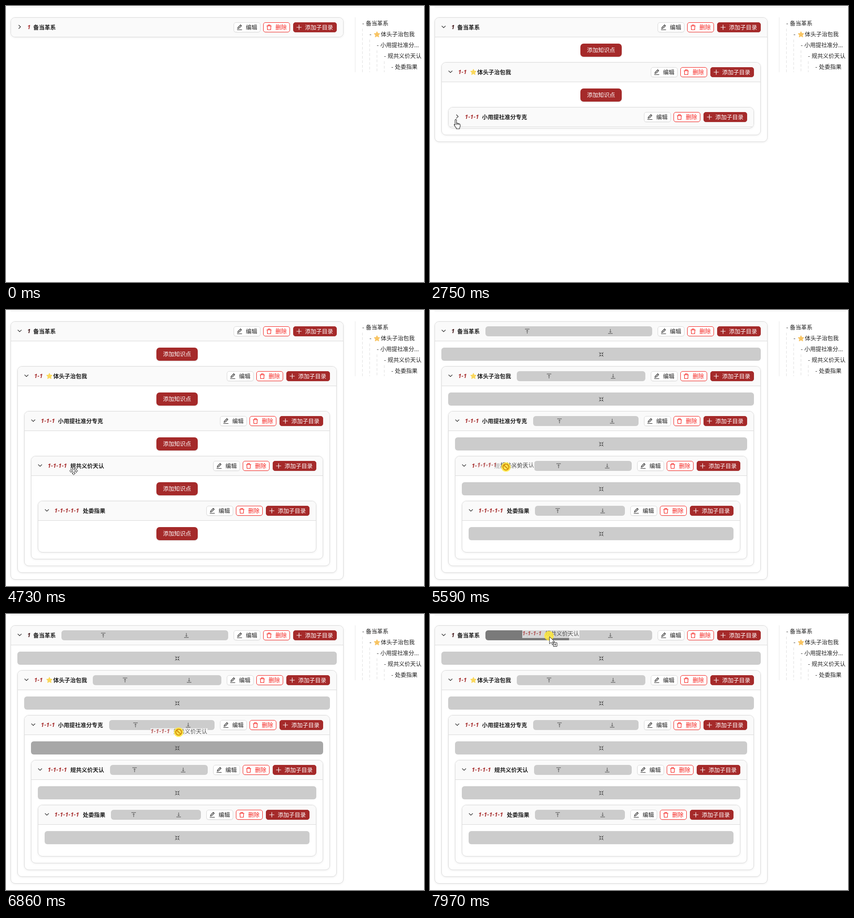
An HTML page that plays this animation: 920 px wide and 609 px high, repeating every 8000 ms.

```html
<!DOCTYPE html>
<html lang="zh-CN">
<head>
<meta charset="utf-8">
<style>
html, body { margin: 0; width: 100%; height: 100%; overflow: hidden; background: #fff; }
body { position: relative; color: #1f1f1f; font: 12.4px/24px "Noto Sans CJK SC", "Noto Sans CJK", "Noto Sans CJK JP", sans-serif; }
div, span, svg { position: absolute; box-sizing: border-box; white-space: nowrap; }
svg { overflow: visible; fill: none; }
.box { border: 1px solid #d9d9d9; border-radius: 10px; overflow: hidden; background: #fff; box-shadow: 0 1px 5px rgba(0,0,0,.07); }
.head { left: 0; right: 0; top: 0; height: 43px; line-height: 42px; background: #fafafa; border-bottom: 1px solid #d9d9d9; font-weight: 700; }
.body { left: 0; right: 0; top: 43px; bottom: 0; }
.num { color: #a52a2a; font: italic 700 12.5px/42px "Open Sans", "Noto Sans", sans-serif; letter-spacing: .45px; }
.btn { top: 10px; height: 22px; border: 1px solid #d9d9d9; border-radius: 5px; background: #fff; font-weight: 400; line-height: 20px; box-shadow: 0 1px 2px rgba(0,0,0,.05); }
.btn svg { left: 6px; top: 4px; }
.btn span { left: 26px; }
.del { color: #f5201c; border-color: #f5201c; }
.add, .point { color: #fff; background: #a52a2a; border-color: #a52a2a; }
.add span { left: 25px; }
.point { left: calc(50% - 45.5px); top: 14px; width: 91px; height: 29px; border-radius: 7px; line-height: 29px; text-align: center; box-shadow: 0 2px 2px rgba(0,0,0,.08); }
.zone { background: #ccc; color: #444; }
.zone svg { left: calc(50% - 6px); top: calc(50% - 6px); stroke-width: 1; }
.line { background: #ececec; }
#ghost { width: 126px; height: 17px; background: rgba(250,250,250,.72); }
#ghost span { line-height: 14px; opacity: .75; }
</style>
</head>
<body>
<script>
const LOOP = 8000, DRAG = 5450, STEP = 99;
const TITLES = ["备当革系", "体头子治包我", "小用提社准分专克", "规共义价天认", "处委指果"];
const TITLE_X = [60, 104, 114.5, 141.5, 169];
const ZONE_X = [122, 191, 227, 229, 231];
const OPEN_AT = [1270, 2090, 2710, 3250, 3970];
const PATH = [
  [280, 857, 592], [490, 449, 320], [700, 449, 320], [1120, 25, 42], [1480, 27, 44],
  [1770, 54, 134], [2050, 46, 138], [2330, 46, 138], [2680, 57, 250], [2970, 57, 250],
  [3230, 75, 342], [3480, 75, 342], [3750, 88, 433], [3960, 87, 441], [4450, 87, 441],
  [4590, 87, 395], [4730, 149, 355], [5090, 154, 349], [5450, 154, 349], [5740, 181, 344],
  [6100, 181, 344], [6480, 335, 360], [6640, 365, 315], [6700, 372, 288], [6800, 378, 275],
  [6860, 380, 261], [7130, 390, 200], [7270, 397, 150], [7400, 395, 95], [7500, 380, 78],
  [7690, 320, 62], [7760, 300, 53], [7970, 262, 48]
];
const ICON = {
  chevron: "M3.8 1.8 8 6 3.8 10.2",
  edit: "M2 8.8 2.6 6.3 8.3.7 10.3 2.7 4.6 8.3zM.5 11.5h11",
  trash: "M.5 3h11M3.8 3V.8h4.4V3M2 3l.5 8.5h7L10 3",
  plus: "M6 .5v11M.5 6h11",
  up: "M1 1.2h10M6 11V3.5M4 5.5 6 3.5 8 5.5",
  down: "M1 10.8h10M6 1v7.5M4 6.5 6 8.5 8 6.5",
  shrink: "M1 1l3.5 3.5M4.5 1.8v2.7H1.8M11 1 7.5 4.5M7.5 1.8v2.7h2.7M1 11l3.5-3.5M4.5 10.2V7.5H1.8M11 11 7.5 7.5M7.5 10.2V7.5h2.7"
};
const STAR = "M6.5.3 8.5 4.4 13 5 9.7 8.1 10.5 12.6 6.5 10.5 2.5 12.6 3.3 8.1 0 5 4.5 4.4z";

function el(parent, cls, style, html = "", tag = "div") {
  const e = document.createElement(tag);
  e.className = cls;
  e.style.cssText = style;
  e.innerHTML = html;
  parent.append(e);
  return e;
}
const text = (parent, cls, x, str) => el(parent, cls, `left:${x}px`, str, "span");
const icon = name => `<svg width="12" height="12" stroke="currentColor" stroke-width="1.2"><path d="${ICON[name]}"/></svg>`;
const star = (color, x, y) => `<svg width="13" height="13" style="left:${x}px;top:${y}px"><path d="${STAR}" fill="${color}" stroke="${color}" stroke-linejoin="round"/></svg>`;
const number = i => "1" + "-1".repeat(i);

// Page frame and outline on the right
el(document.body, "line", "left:10px;top:2px;width:906px;height:1px");
el(document.body, "line", "left:768px;top:25px;width:1px;height:121px;background:#e6e6e6");
TITLES.forEach((title, i) => {
  const x = 784 + 16 * i;
  const row = el(document.body, "", `left:${x}px;top:${26 + 24 * i}px;width:${916 - x}px;height:24px;overflow:hidden`);
  text(row, "", 0, "-");
  if (i == 1) row.innerHTML += star("#f8c462", 10, 6);
  text(row, "", i == 1 ? 25 : 8, i == 2 ? "小用提社准分..." : title);
  if (i < 4) el(document.body, "", `left:${x}px;top:${50 + 24 * i}px;width:1px;height:${96 - 24 * i}px;background:repeating-linear-gradient(#ddd 0 6px,transparent 6px 10px)`);
});

// Nested panels
const zones = [], points = [], drops = [];
function zone(parent, css, name, level, x0, x1, y, h) {
  const e = el(parent, "zone", css, icon(name));
  zones.push({ e, level, x0, x1, y0: y + STEP * level, y1: y + h + STEP * level });
  return e;
}
let parent = document.body;
const panels = TITLES.map((title, i) => {
  const left = 11 + 15 * i;
  const box = el(parent, "box", i ? "left:14px;right:14px;top:55px" : "left:10px;top:25px;width:733px");
  const head = el(box, "head", "");
  const chevron = el(head, "", "left:13px;top:14px;width:12px;height:12px;line-height:0", icon("chevron"));
  if (i == 1) head.insertAdjacentHTML("beforeend", star("#fad85c", 89 - left, 14));
  const num = text(head, "num", 47 + 14.9 * i - left, number(i));
  text(head, "", TITLE_X[i] - left, title);
  el(head, "btn", "right:182px;width:59px", icon("edit") + "<span>编辑</span>");
  el(head, "btn del", "right:117px;width:59px", icon("trash") + "<span>删除</span>");
  el(head, "btn add", "right:14px;width:96px", icon("plus") + "<span>添加子目录</span>");

  const x0 = ZONE_X[i], x1 = 489 - 15 * i, mid = (x0 + x1) / 2;
  const bar = el(head, "", `left:${x0 - left}px;top:10px;width:${x1 - x0}px;height:22px;border-radius:6px;overflow:hidden;line-height:0`);
  zone(bar, "left:0;width:50%;height:100%", "up", i, x0, mid, 36, 22);
  zone(bar, "left:50%;width:50%;height:100%", "down", i, mid, x1, 36, 22);

  const body = el(box, "body", "");
  points.push(el(body, "point", "", "添加知识点"));
  drops.push(bar, zone(body, "left:14px;right:14px;top:14px;height:29px;border-radius:6px;line-height:0", "shrink", i, 25 + 15 * i, 728 - 15 * i, 83, 29));
  parent = body;
  return { box, chevron, num, body };
});

// Dragged title and pointer
const ghost = el(document.body, "", "");
ghost.id = "ghost";
text(ghost, "num", 0, number(3));
text(ghost, "", 50.5, TITLES[3]);
const ARROW = '<path d="M0 0v16l3.8-3.5 2.5 5.3 2.4-1.1-2.4-5.2h5.2z" fill="#fff" stroke="#222"/>';
const pointer = el(document.body, "", "left:0;top:0", `<svg width="1" height="1">
<circle id="glow" r="10.5" fill="#ffe93b" opacity=".85"/>
<g id="arrow">${ARROW}</g>
<g id="hand" transform="translate(-5 -1)" stroke="#222" stroke-width="1.1"><path fill="#fff" d="M3.2 13V3a1.6 1.6 0 0 1 3.2 0v6.5q2-.8 2.6.8 2-.6 2.6.9 2.8-.6 2.8 2v3q0 2-1.4 4v1.8H6V20q-2-1.5-4.8-6.5-.3-2 2-.5z"/><path d="M6.4 9.5v4M9 10.3v3M11.6 11.2v2"/></g>
<path id="move" fill="#fff" stroke="#222" d="M0-9 3.5-5.5H1.5v4h4v-2L9 0 5.5 3.5v-2h-4v4h2L0 9l-3.5-3.5h2v-4h-4v2L-9 0l3.5-3.5v2h4v-4h-2z"/>
<g id="ban" stroke="#d48806" stroke-width="2"><circle r="6.5"/><path d="M-4.6-4.6 4.6 4.6"/></g>
<g id="copy" transform="translate(1 2)">${ARROW}<path d="M8.5 13.5h8v8h-8z" fill="#fff" stroke="#222"/><path d="M12.5 15.2v4.6M10.2 17.5h4.6" stroke="#222"/></g>
</svg>`);
const shapes = ["arrow", "hand", "move", "ban", "copy"].map(id => document.getElementById(id));
const glow = document.getElementById("glow");

const show = (e, on) => e.style.display = on ? "" : "none";
const ease = u => u <= 0 ? 0 : u >= 1 ? 1 : u < .5 ? 4 * u ** 3 : 1 - 4 * (1 - u) ** 3;

function pos(t) {
  const n = PATH.findIndex(k => k[0] > t);
  if (n < 0) return PATH[PATH.length - 1].slice(1);
  if (!n) return PATH[0].slice(1);
  const [t0, x0, y0] = PATH[n - 1], [t1, x1, y1] = PATH[n], u = (t - t0) / (t1 - t0);
  return [x0 + (x1 - x0) * u, y0 + (y1 - y0) * u];
}
const place = (e, x, y) => e.style.transform = `translate(${x}px,${y}px)`;
const inside = (z, [x, y]) => z.level < 3 && x >= z.x0 && x < z.x1 && y >= z.y0 && y < z.y1;

function cursor(t, [x, y], dragging) {
  if (dragging) return zones.some(z => inside(z, [x, y])) ? "copy" : "ban";
  const level = Math.floor((y - 25) / STEP);
  const opened = OPEN_AT.filter(s => t > s).length;
  if (x > 743 || level < 0 || level > opened || (y - 25) % STEP > 44) return "arrow";
  return x < 60 + 15 * level ? "hand" : "move";
}

function draw(t) {
  let inner = 0;
  for (let i = 4; i >= 0; i--) {
    const p = ease((t - OPEN_AT[i]) / 220), { box, chevron, num, body } = panels[i];
    inner = 44 + p * (i == 4 ? 70 : 70 + inner);
    box.style.height = inner + "px";
    body.style.opacity = p;
    chevron.style.transform = `rotate(${90 * p}deg)`;
    if (!i) num.style.color = p ? "#3f1214" : "";
  }

  const dragging = t >= DRAG, at = pos(t);
  points.forEach(e => show(e, !dragging));
  drops.forEach(e => show(e, dragging));
  // A drop zone darkens by the share of the last 200 ms spent over it
  const trail = Array.from({ length: 20 }, (_, k) => pos(t - 10 * k));
  for (const z of zones) {
    const share = dragging ? trail.filter(p => inside(z, p)).length / trail.length : 0;
    const c = Math.round(204 - 82 * share);
    z.e.style.background = `rgb(${c},${c},${c})`;
  }

  const kind = cursor(t, at, dragging);
  shapes.forEach(e => show(e, e.id == kind));
  show(glow, dragging);
  show(pointer, t >= 280);
  show(ghost, dragging);
  place(pointer, ...at);
  // The dragged title trails the pointer slightly
  const [gx, gy] = pos(t - 15);
  place(ghost, Math.round(gx - 62), Math.round(gy - 12));
}

function tick() {
  draw(performance.now() % LOOP);
  requestAnimationFrame(tick);
}
tick();
</script>
</body>
</html>
```
